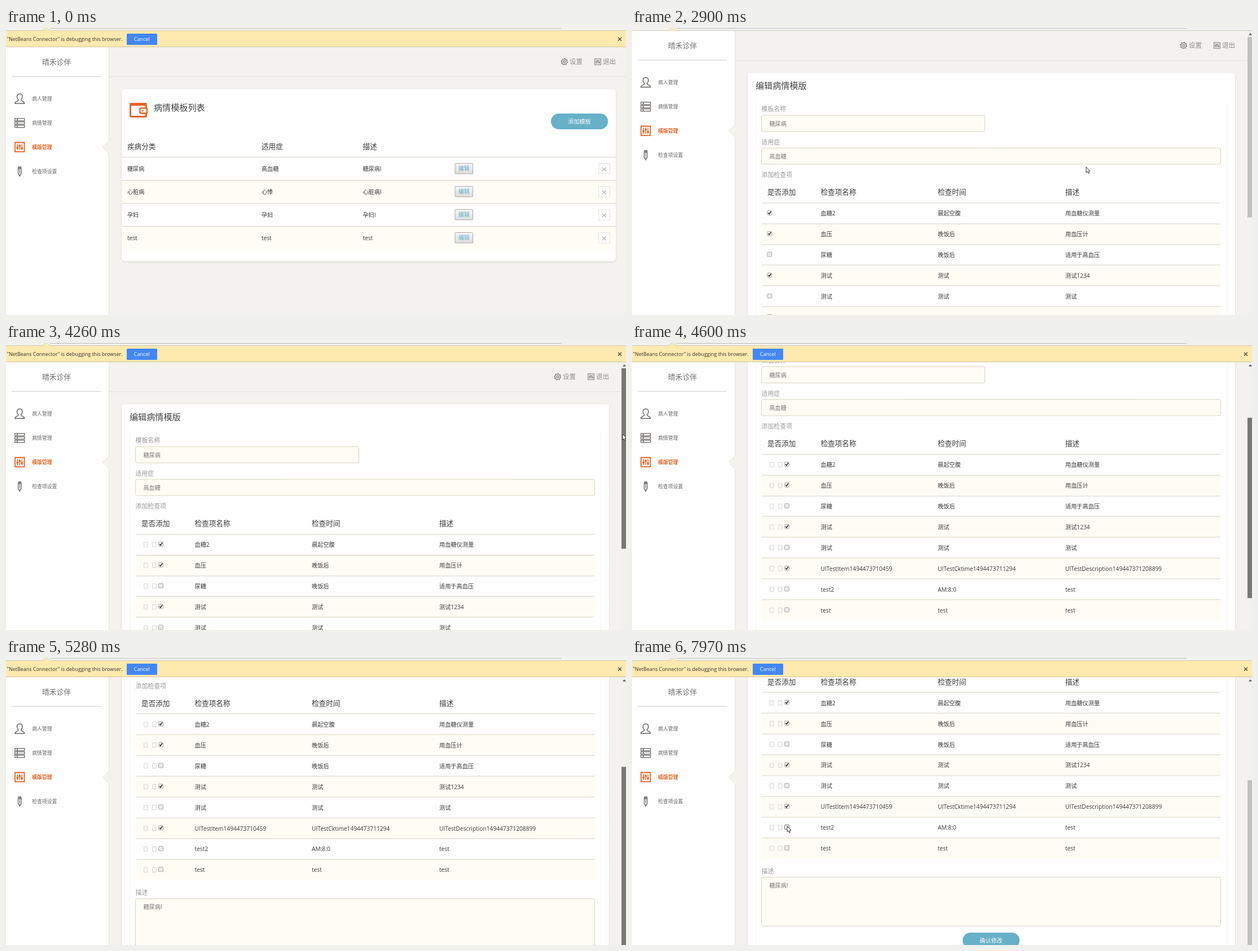
An HTML page with a canvas for the animation above (8000 ms loop, 1099 px wide and 510 px high).

```html
<!DOCTYPE html>
<html lang="zh-CN">
<head>
<meta charset="utf-8">
<title>模版管理</title>
<style>
html, body { margin: 0; width: 100%; height: 100%; overflow: hidden; background: #f3f2ee; }
canvas { display: block; }
</style>
</head>
<body>
<canvas id="stage" width="1099" height="510"></canvas>
<script>
const ctx = document.getElementById('stage').getContext('2d');
const W = 1099, H = 510, LOOP = 8000;
const FONT = '"Open Sans", "Noto Sans CJK SC", "Noto Sans CJK", sans-serif';
const BG = '#f3f2ee', WHITE = '#fefefe', CREAM = '#fffcf5', RULE = '#d8d4c8';
const ORANGE = '#e8601f', GREY = '#7d7b78', BLUE = '#67b0c8', INK = '#3a3a3a';

// Bursts of screen updates: first, last, count
const BURSTS = [
  [0, 0, 1], [1010, 1730, 10], [1780, 1780, 1], [1860, 2090, 4], [2260, 2340, 2],
  [2580, 2640, 2], [2900, 3190, 5], [3280, 3660, 6], [3730, 4260, 7], [4360, 4510, 3],
  [4600, 4890, 5], [4980, 5360, 6], [5440, 5760, 5], [7060, 7130, 2], [7420, 7740, 6],
  [7970, 7970, 1]
];
// Keys: time, value(s)
const POINTER = [
  [1010, 1031, 485], [1250, 985, 425], [1500, 880, 330], [1730, 813, 287], [1780, 812, 287],
  [1860, 810, 279], [2090, 805, 258], [2260, 805, 252], [2340, 804, 247], [2900, 805, 247],
  [3730, 812, 245], [3900, 905, 215], [4080, 1045, 175], [4260, 1093, 162],
  [4510, 1096, 236], [4600, 1110, 270], [7059, 1110, 430], [7060, 1040, 410],
  [7130, 443, 360], [7420, 400, 345], [7600, 300, 310], [7676, 268, 296],
  [7740, 275, 291], [7970, 275, 299]
];
const SCROLL = [[4260, 0], [4360, 38], [4510, 120], [4600, 142], [4890, 209.5], [5360, 255], [5440, 261], [5760, 278.5]];
const BAR = [[2899, 0], [2900, -29], [3045, -22], [3190, -6.5], [3280, -1], [3360, 0]];

const LIST_ROWS = [
  ['糖尿病', '高血糖', '糖尿病I'],
  ['心脏病', '心悸', '心脏病I'],
  ['孕妇', '孕妇', '孕妇I'],
  ['test', 'test', 'test']
];
const CHECK_ROWS = [
  [true, '血糖2', '晨起空腹', '用血糖仪测量'],
  [true, '血压', '晚饭后', '用血压计'],
  [false, '尿糖', '晚饭后', '适用于高血压'],
  [true, '测试', '测试', '测试1234'],
  [false, '测试', '测试', '测试'],
  [true, 'UITestItem1494473710459', 'UITestCktime1494473711294', 'UITestDescription149447371208899'],
  [false, 'test2', 'AM:8:0', 'test'],
  [false, 'test', 'test', 'test']
];

function lastUpdate(t) {
  let u = 0;
  for (const [a, b, n] of BURSTS) {
    if (t < a) break;
    const gap = n > 1 ? (b - a) / (n - 1) : 1;
    u = a + gap * Math.min(n - 1, Math.floor((t - a) / gap + 1e-6));
  }
  return u;
}

function track(keys, t) {
  if (t <= keys[0][0]) return keys[0].slice(1);
  for (let i = 1; i < keys.length; i++) {
    const a = keys[i - 1], b = keys[i];
    if (t <= b[0]) {
      const k = (t - a[0]) / (b[0] - a[0]);
      return a.slice(1).map((v, j) => v + (b[j + 1] - v) * k);
    }
  }
  return keys[keys.length - 1].slice(1);
}

function text(s, x, y, size, color, align = 'left', weight = 400) {
  ctx.font = `${weight} ${size}px ${FONT}`;
  ctx.textAlign = align;
  ctx.fillStyle = color;
  ctx.fillText(s, x, y + size * 0.37);
}

function rect(x, y, w, h, color) {
  ctx.fillStyle = color;
  ctx.fillRect(x, y, w, h);
}

function box(x, y, w, h, r, fill, stroke, line = 1) {
  ctx.beginPath();
  ctx.roundRect(x, y, w, h, r);
  if (fill) { ctx.fillStyle = fill; ctx.fill(); }
  if (stroke) { ctx.strokeStyle = stroke; ctx.lineWidth = line; ctx.stroke(); }
}

function poly(pts, fill, stroke, line = 1, close = true) {
  ctx.beginPath();
  pts.forEach(([x, y]) => ctx.lineTo(x, y));
  if (close) ctx.closePath();
  if (fill) { ctx.fillStyle = fill; ctx.fill(); }
  if (stroke) { ctx.strokeStyle = stroke; ctx.lineWidth = line; ctx.stroke(); }
}

function cross(x, y, r, color, line) {
  poly([[x - r, y - r], [x + r, y + r]], null, color, line, false);
  poly([[x + r, y - r], [x - r, y + r]], null, color, line, false);
}

function at(x, y, scale, draw) {
  ctx.save();
  ctx.translate(x, y);
  ctx.scale(scale, scale);
  draw();
  ctx.restore();
}

function person() {
  ctx.strokeStyle = GREY;
  ctx.lineWidth = 1.7;
  ctx.beginPath();
  ctx.moveTo(-2.2, 2);
  ctx.bezierCurveTo(-7, -4, -4.5, -8.5, 0, -8.5);
  ctx.bezierCurveTo(4.5, -8.5, 7, -4, 2.2, 2);
  ctx.bezierCurveTo(2, 4.5, 8.5, 4, 8.5, 8.5);
  ctx.lineTo(-8.5, 8.5);
  ctx.bezierCurveTo(-8.5, 4, -2, 4.5, -2.2, 2);
  ctx.stroke();
}

function stack() {
  for (const y of [-8, -2, 4]) {
    box(-8.5, y, 4, 4, 0, null, GREY, 1.5);
    box(-4.5, y, 13, 4, 0, null, GREY, 1.5);
  }
}

function sliders(color) {
  box(-8.2, -8.2, 16.4, 16.4, 0, null, color, 1.8);
  [[-4, 1], [0, -2], [4, 2]].forEach(([x, y]) => {
    rect(x - 0.7, -5.5, 1.4, 11, color);
    ctx.beginPath();
    ctx.arc(x, y, 1.9, 0, 7);
    ctx.fill();
  });
}

function pencil() {
  poly([[-2.7, -5], [-2.7, 4], [0, 8.5], [2.7, 4], [2.7, -5]], null, GREY, 1.5);
  box(-2.7, -8.3, 5.4, 3.4, 1.2, GREY, GREY, 1);
  rect(-0.6, -5, 1.2, 9, GREY);
  poly([[-1.5, 5.5], [0, 8.5], [1.5, 5.5]], GREY);
}

function gear() {
  const pts = [];
  for (let i = 0; i < 32; i++) {
    const r = i % 4 < 2 ? 5.7 : 4.3, a = (i + 0.5) * Math.PI / 16;
    pts.push([r * Math.cos(a), r * Math.sin(a)]);
  }
  poly(pts, null, GREY, 1.2);
  ctx.beginPath();
  ctx.arc(0, 0, 1.9, 0, 7);
  ctx.stroke();
}

function wallet() {
  ctx.lineJoin = 'round';
  box(220.5, 136.5, 28, 21, 1.5, null, ORANGE, 2.8);
  poly([[220.5, 138], [220.5, 134.3], [248, 134.3], [248, 138]], null, ORANGE, 2.6, false);
  box(237.5, 142.5, 12.5, 9, 1.5, WHITE, ORANGE, 2.4);
  rect(240.5, 145.7, 3, 2.6, ORANGE);
  ctx.lineJoin = 'miter';
}

function sidebar() {
  rect(0, 0, 182, H + 40, WHITE);
  rect(182, 0, 1, H + 40, '#e2e1dc');
  poly([[183, 200], [171, 212], [183, 224]], BG);
  poly([[182.5, 200.5], [171.2, 212], [182.5, 223.5]], null, '#e8e7e3', 1, false);
  text('晴禾诊伴', 89.5, 60, 12.8, '#6f6f6f', 'center');
  rect(10, 85.5, 158, 1, '#c9c9c9');
  const icons = [person, stack, () => sliders(ORANGE), pencil];
  ['病人管理', '病情管理', '模版管理', '检查项设置'].forEach((label, i) => {
    const y = 126 + 43 * i, on = i === 2;
    at(24.3, y - 0.3, 1, icons[i]);
    text(label, 46.3, y, 8.8, on ? ORANGE : '#666', 'left', on ? 700 : 400);
  });
}

function header(shift) {
  rect(183, 86, W, 1, '#e2e1dc');
  at(989.7 - shift, 60, 1, gear);
  text('设置', 999 - shift, 60, 11.5, '#8d8b88');
  at(1049 - shift, 60, 0.64, () => sliders(GREY));
  text('退出', 1058 - shift, 60, 11.5, '#8d8b88');
}

function panel(w, h) {
  ctx.save();
  ctx.shadowColor = 'rgba(0,0,0,.13)';
  ctx.shadowBlur = 3;
  ctx.shadowOffsetY = 1;
  box(205, 108.5, w, h, 5, WHITE);
  ctx.restore();
}

function pill(label, x, y) {
  box(x, y, 101, 28, 14, BLUE);
  text(label, x + 50.5, y + 14, 10.1, '#fff', 'center');
}

function editButton(y, hover, down) {
  const g = ctx.createLinearGradient(0, y, 0, y + 19);
  g.addColorStop(0, down ? '#d8d8d8' : '#f7f7f7');
  g.addColorStop(1, down ? '#ececec' : '#dcdcdc');
  box(796, y + 0.5, 31.5, 18.5, 1, g, hover ? '#666' : '#aaa');
  text('编辑', 811.8, y + 9.7, 9.9, '#62abc6', 'center');
}

function listPage(t) {
  header(0);
  panel(876, 306);
  wallet();
  text('病情模板列表', 262, 141, 15.1, '#444');
  pill('添加模板', 966, 152);
  const cols = [215, 453, 632.5];
  ['疾病分类', '适用症', '描述'].forEach((s, i) => text(s, cols[i], 210, 12.6, INK));
  const hot = t < 1650 ? -1 : t < 1930 ? 1 : 0;
  LIST_ROWS.forEach((row, i) => {
    const y = 229.5 + 41 * i;
    if (i % 2) rect(205, y, 876, 40, CREAM);
    rect(205, y - 0.5, 876, 1, RULE);
    row.forEach((s, c) => text(s, cols[c], y + 20.5, 10.1, INK));
    editButton(y + 10.5, hot === i, i === 0 && t >= 2580 && t < 2640);
    box(1050.5, y + 11, 20, 19, 0, '#fbfbfa', '#e6e5e2');
    cross(1060.3, y + 21.5, 3.3, '#b9b9b7', 1.4);
  });
}

function checkbox(x, y, on, hover) {
  box(x - 4, y - 4, 8, 8, 1.5, on ? '#f4f4f4' : '#e9e9e9', hover ? '#777' : '#aaa');
  if (on) poly([[x - 2.4, y], [x - 0.6, y + 2], [x + 2.7, y - 2.7]], null, '#333', 1.6, false);
}

function field(y, w, h, value) {
  box(229.5, y, w, h, 3, '#fffcf5', '#d9d3c0');
  text(value, 243.5, y + 15, 10.1, '#777');
}

function editPage(t, scroll) {
  ctx.save();
  ctx.translate(0, -scroll);
  header(12);
  panel(864, 760);
  text('编辑病情模版', 219, 131.5, 15.1, '#444');
  rect(219, 160, 1, 660, '#f5f5f3');
  rect(1054, 160, 1, 660, '#f5f5f3');
  const label = (s, y) => text(s, 229.5, y, 10.9, '#999');
  label('模板名称', 173);
  field(184, 396, 29, '糖尿病');
  label('适用症', 231.5);
  field(242.3, 814, 28.7, '高血糖');
  label('添加检查项', 290);

  const cols = [240, 334.5, 542, 768];
  ['是否添加', '检查项名称', '检查时间', '描述'].forEach((s, i) => text(s, cols[i], 320.5, 12.6, INK));
  const loaded = t >= 3430;
  CHECK_ROWS.forEach(([on, ...cells], i) => {
    const y = 339.7 + 36.93 * i;
    if (i % 2) rect(230, y, 813, 36.5, CREAM);
    rect(230, Math.round(y - scroll) + scroll - 0.5, 813, 1, RULE);
    if (loaded) for (const x of [244.5, 259.5]) box(x, y + 14.5, 6.5, 8, 0, null, '#d0d0ce', 0.9);
    checkbox(loaded ? 274.5 : 243.8, y + 17.7, on, i === 6 && t >= 7740);
    cells.forEach((s, c) => text(s, cols[c + 1], y + 18.7, 10.2, INK));
  });

  label('描述', 657.5);
  field(668, 814, 87, '糖尿病I');
  pill('确认修改', 586, 766.5);
  ctx.restore();

  rect(1091, 33, 8, H, '#f1f1f1');
  poly([[1093, 41.5], [1096, 38], [1099, 41.5]], '#505050');
  const held = t >= 4260 && t < 7060;
  const near = t >= 4170 && t < 7420;
  rect(1091, 45 + scroll * 0.618, 8, 320.5, held ? '#787878' : near ? '#a8a8a8' : '#c1c1c1');
}

function browserBar() {
  rect(0, 4, W, 29, '#fee9ae');
  rect(0, 33, W, 1, '#d3c397');
  text('"NetBeans Connector" is debugging this browser.', 1.5, 20, 8.95, '#333');
  box(214, 10, 54, 20, 1.5, '#4387f5');
  text('Cancel', 240.7, 20, 9, '#fff', 'center');
  cross(1088, 19.7, 2.9, '#555', 1.5);
}

function tabStrip() {
  rect(0, 0, W, 4, '#f2f2f2');
  rect(78, 0, 906, 1, '#b9b9b9');
  rect(0, 4, W, 1, '#cfc9b8');
  poly([[65, 5], [71.5, -1], [78, 5]], '#fee9ae');
  poly([[65, 4.5], [71.5, -1.5], [78, 4.5]], null, '#cfc9b8', 1, false);
}

function arrow() {
  poly([[0, 0], [0, 10], [2.3, 8], [3.9, 11.6], [5.6, 10.8], [4, 7.4], [7, 7.2]], '#fff', '#222', 0.9);
}

function hand() {
  ctx.beginPath();
  ctx.moveTo(0, 1);
  ctx.quadraticCurveTo(1, -0.8, 2, 1);
  ctx.lineTo(2, 4);
  ctx.lineTo(6.5, 5);
  ctx.quadraticCurveTo(7.4, 5.4, 7.2, 7);
  ctx.lineTo(6, 10);
  ctx.lineTo(6, 11.8);
  ctx.lineTo(1, 11.8);
  ctx.lineTo(-2.4, 7.6);
  ctx.quadraticCurveTo(-2.6, 5.8, 0, 7.6);
  ctx.closePath();
  ctx.fillStyle = '#fff';
  ctx.strokeStyle = '#222';
  ctx.lineWidth = 1;
  ctx.fill();
  ctx.stroke();
  for (const x of [3.6, 5.2]) poly([[x, 4.6], [x, 6.8]], null, '#222', 0.7, false);
}

function draw(now) {
  const t = lastUpdate(now % LOOP);
  const [shift] = track(BAR, t);
  rect(0, 0, W, H, BG);
  ctx.save();
  ctx.translate(0, shift);
  if (t < 2900) listPage(t);
  else editPage(t, track(SCROLL, t)[0]);
  sidebar();
  browserBar();
  ctx.restore();
  tabStrip();
  if (t >= 1010) {
    const [x, y] = track(POINTER, t);
    at(x, y, 1, t >= 1650 && t < 2900 ? hand : arrow);
  }
}

const start = performance.now();
function tick() {
  draw(performance.now() - start);
  requestAnimationFrame(tick);
}
tick();
</script>
</body>
</html>
```
